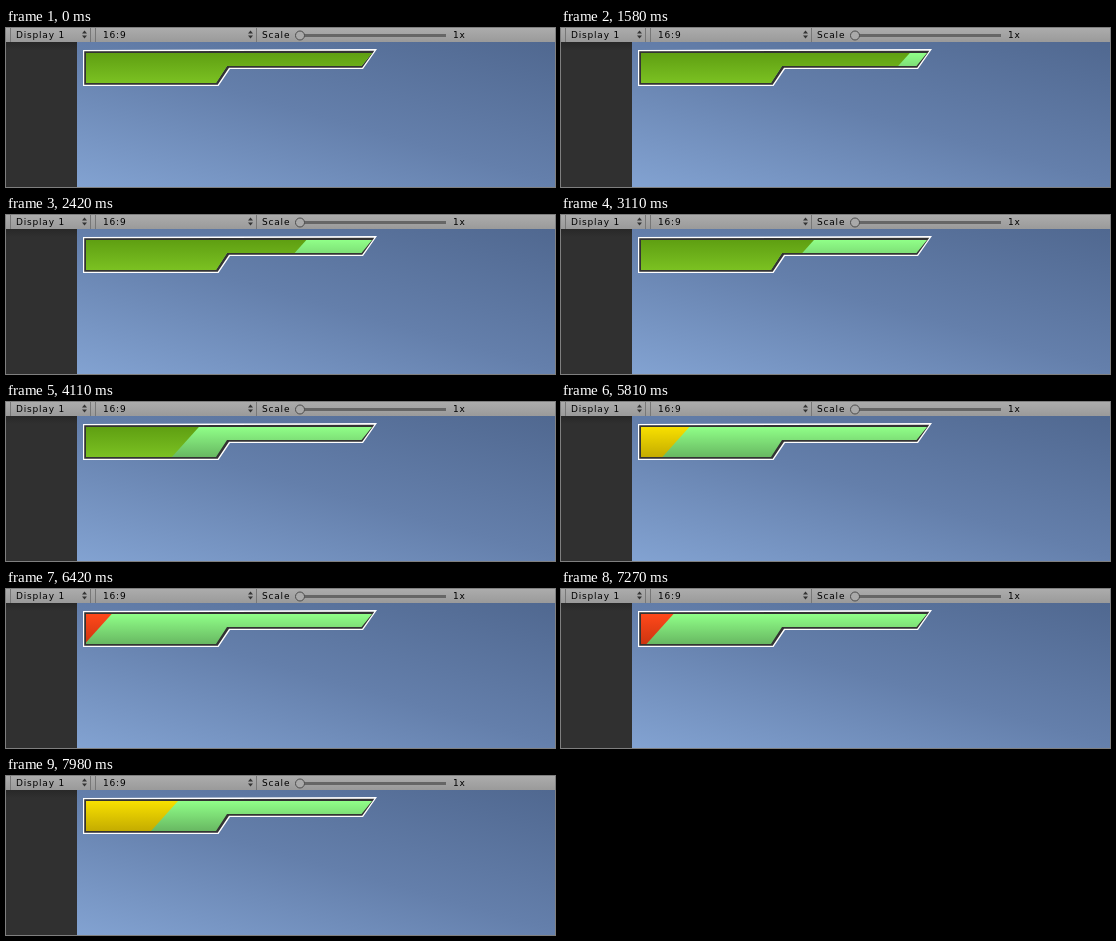
An HTML page with a canvas that plays this animation: 549x159 px, repeating every 8 s.

```html
<!DOCTYPE html>
<html lang="en">
<head>
<meta charset="utf-8">
<title>Health bar</title>
<style>
html, body { margin: 0; width: 100%; height: 100%; overflow: hidden; background: #303030; }
canvas { display: block; }
</style>
</head>
<body>
<canvas id="stage" width="549" height="159"></canvas>
<script>
const ctx = document.getElementById('stage').getContext('2d');
const LOOP = 8000, STEP = 77, FIRST = 1258;
const LEFT = 80, RIGHT = 366, TOP = 25, BOTTOM = 55, SLANT = 27;

// Health drains, rests, drains to nothing, then refills: [time, right edge]
const keys = [
  [0, RIGHT], [1190, RIGHT], [2040, 328], [2880, 267], [4580, 165],
  [5190, 137], [5573, 137], [6420, 106], [6800, LEFT], [6893, LEFT], [7965, 172], [LOOP, 172]
];

// The picture updates about 13 times a second.
function edgeAt(time) {
  const t = Math.max(0, FIRST + 8 + Math.floor((time - FIRST) / STEP) * STEP);
  const i = keys.findIndex(k => k[0] > t);
  const [t0, x0] = keys[i - 1], [t1, x1] = keys[i];
  return x0 + (x1 - x0) * (t - t0) / (t1 - t0);
}

function gradient(x0, y0, x1, y1, ...colors) {
  const g = ctx.createLinearGradient(x0, y0, x1, y1);
  colors.forEach((c, i) => g.addColorStop(i / (colors.length - 1), c));
  return g;
}

const shade = (from, to) => gradient(0, TOP, 0, BOTTOM, from, to);

function rect(x, y, w, h, fill) {
  ctx.fillStyle = fill;
  ctx.fillRect(x, y, w, h);
}

function poly(fill, ...p) {
  ctx.beginPath();
  for (let i = 0; i < p.length; i += 2) ctx.lineTo(p[i], p[i + 1]);
  ctx.closePath();
  ctx.fillStyle = fill;
  ctx.fill();
}

function text(s, x) {
  ctx.fillStyle = '#000';
  ctx.fillText(s, x, 10);
}

function popupArrows(x) {
  poly('#333', x - 2.5, 5.5, x, 2.5, x + 2.5, 5.5);
  poly('#333', x - 2.5, 7.5, x, 10.5, x + 2.5, 7.5);
}

function toolbar() {
  rect(0, 0, 549, 14, gradient(0, 0, 0, 14, '#acacac', '#9a9a9a'));
  for (const x of [4, 84, 89, 250]) rect(x, 0, 1, 14, '#777');
  ctx.font = '9px "DejaVu Sans", sans-serif';
  ctx.letterSpacing = '0.8px';
  text('Display 1', 10);
  text('16:9', 97);
  text('Scale', 256);
  text('1x', 447);
  popupArrows(78.5);
  popupArrows(244.5);
  rect(290, 6, 150, 3, '#666');
  ctx.beginPath();
  ctx.arc(294, 7.5, 4.5, 0, Math.PI * 2);
  ctx.fillStyle = '#a9a9a9';
  ctx.fill();
  ctx.strokeStyle = '#4c4c4c';
  ctx.lineWidth = 1;
  ctx.stroke();
}

function backdrop() {
  rect(0, 14, 71, 145, '#303030');
  rect(0, 14, 71, 8, gradient(0, 14, 0, 22, '#282828', '#303030'));
  rect(71, 14, 478, 145, gradient(549, 14, 476, 274, '#506890', '#647fab', '#83a3d2'));
}

function fillShade(level) {
  if (level < 0.15) return shade('#ff481a', '#cd3510');
  if (level < 0.35) return shade('#f8e000', '#c4ac00');
  return shade('#5f9f12', '#7bc122');
}

function bar(edge) {
  poly('#fff', 77, 22, 371, 21, 357, 41, 224, 41, 212.5, 58, 77, 58);
  poly('#333', 78.2, 23.2, 368.3, 22.7, 356.2, 39.8, 223, 39.8, 211.7, 56.8, 78.2, 56.8);
  ctx.save();
  poly(shade('#90ff88', '#68b862'), LEFT, TOP, RIGHT, TOP, 355.5, 38, 221, 38, 210, BOTTOM, LEFT, BOTTOM);
  ctx.clip();
  const level = (edge - LEFT) / (RIGHT - LEFT);
  // At full health the clip alone shapes the right end.
  const x = level >= 1 ? RIGHT + SLANT : edge;
  if (level > 0) poly(fillShade(level), LEFT - SLANT, TOP, x, TOP, x - SLANT, BOTTOM, LEFT - SLANT, BOTTOM);
  ctx.restore();
}

const start = performance.now();
function frame() {
  backdrop();
  toolbar();
  bar(edgeAt((performance.now() - start) % LOOP));
  requestAnimationFrame(frame);
}
frame();
</script>
</body>
</html>
```
